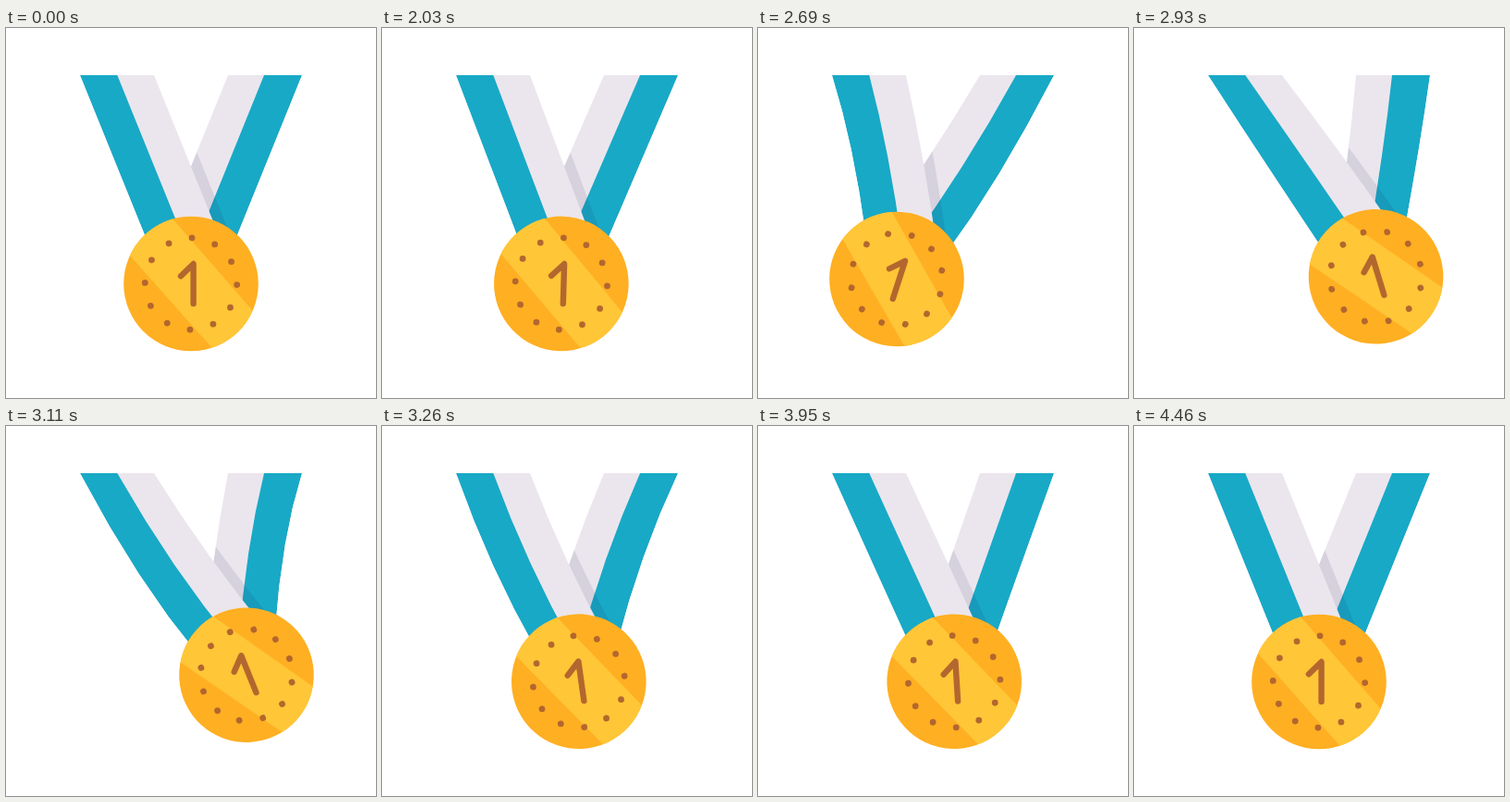
An HTML page without scripts that plays this animation: 400 by 400 pixels, repeating every 4.49 s.

```html
<!DOCTYPE html>
<html lang="en">
<head>
<meta charset="utf-8">
<title>Swinging medal</title>
<style>
@property --swing { syntax: "<angle>"; inherits: true; initial-value: 0deg; }
@property --spin { syntax: "<angle>"; inherits: true; initial-value: 0deg; }

html, body { margin: 0; width: 100%; height: 100%; overflow: hidden; background: #fff; }

.stage {
  --out: cubic-bezier(.39, .575, .565, 1);
  --in-out: cubic-bezier(.37, 0, .63, 1);
  /* medal centre hangs 250px below a pivot; ribbon ends turn with the swing, their bend trails with the spin */
  --turn: calc(var(--swing) * 1.23);
  --cos: cos(var(--turn));
  --sin: sin(var(--turn));
  --bend: calc(var(--spin) * .8);
  --bcos: cos(var(--bend));
  --bsin: sin(var(--bend));
  --cx: calc(200px - 250px * sin(var(--swing)));
  --cy: calc(26.5px + 250px * cos(var(--swing)));
  position: relative; width: 400px; height: 400px; overflow: hidden;
  animation: swing 4490ms infinite var(--in-out), spin 4490ms infinite var(--in-out);
}

/* Each side is a quadratic curve: fixed at the top, its control and end points move with the medal */
.band {
  --lm: calc(var(--l) + 95px * var(--k) - 200px);
  --lb: calc(var(--l) + 190px * var(--k) - 200px);
  --rm: calc(var(--r) + 95px * var(--k) - 200px);
  --rb: calc(var(--r) + 190px * var(--k) - 200px);
  --lmx: calc(var(--cx) + var(--lm) * var(--bcos) + 130.5px * var(--bsin));
  --lmy: calc(var(--cy) + var(--lm) * var(--bsin) - 130.5px * var(--bcos));
  --lbx: calc(var(--cx) + var(--lb) * var(--cos) + 35.5px * var(--sin));
  --lby: calc(var(--cy) + var(--lb) * var(--sin) - 35.5px * var(--cos));
  --rmx: calc(var(--cx) + var(--rm) * var(--bcos) + 130.5px * var(--bsin));
  --rmy: calc(var(--cy) + var(--rm) * var(--bsin) - 130.5px * var(--bcos));
  --rbx: calc(var(--cx) + var(--rb) * var(--cos) + 35.5px * var(--sin));
  --rby: calc(var(--cy) + var(--rb) * var(--sin) - 35.5px * var(--cos));
  position: absolute; inset: 0; background: var(--fill);
  clip-path: polygon(
    var(--l) 51px,
    calc(.5625 * var(--l) + .375 * var(--lmx) + .0625 * var(--lbx)) calc(.5625 * 51px + .375 * var(--lmy) + .0625 * var(--lby)),
    calc(.25 * var(--l) + .5 * var(--lmx) + .25 * var(--lbx)) calc(.25 * 51px + .5 * var(--lmy) + .25 * var(--lby)),
    calc(.0625 * var(--l) + .375 * var(--lmx) + .5625 * var(--lbx)) calc(.0625 * 51px + .375 * var(--lmy) + .5625 * var(--lby)),
    var(--lbx) var(--lby),
    var(--rbx) var(--rby),
    calc(.0625 * var(--r) + .375 * var(--rmx) + .5625 * var(--rbx)) calc(.0625 * 51px + .375 * var(--rmy) + .5625 * var(--rby)),
    calc(.25 * var(--r) + .5 * var(--rmx) + .25 * var(--rbx)) calc(.25 * 51px + .5 * var(--rmy) + .25 * var(--rby)),
    calc(.5625 * var(--r) + .375 * var(--rmx) + .0625 * var(--rbx)) calc(.5625 * 51px + .375 * var(--rmy) + .0625 * var(--rby)),
    var(--r) 51px);
}
.left { --k: .405; --l: 80px; --r: 160px; --fill: #ebe6ed; }
.right { --k: -.405; --l: 240px; --r: 320px; --fill: #ebe6ed; }
.left .teal { --r: 120.3px; --fill: #18a9c7; }
.right .teal { --l: 279px; --fill: #18a9c7; }
.shade { --k: .405; --l: 80px; --r: 172.5px; --fill: rgba(20, 20, 80, .1); }

svg { position: absolute; inset: 0; }
.medal, .face { transform-box: view-box; transform-origin: 200px 276.5px; }
.medal { transform: translate(calc(var(--cx) - 200px), calc(var(--cy) - 276.5px)) rotate(var(--swing)); }
.face { transform: rotate(calc(var(--spin) - var(--swing))); }
.face > * { fill: none; stroke: #b3672e; stroke-linecap: round; stroke-linejoin: round; }

@keyframes swing {
  0%, 45.2% { --swing: 0deg; }
  45.21% { --swing: 1.4deg; animation-timing-function: var(--out); }
  57.75% { --swing: 15.83deg; }
  66.93% { --swing: -16.75deg; }
  77.4% { --swing: 7.5deg; }
  89.42% { --swing: -3.15deg; }
  99.4%, 100% { --swing: 0deg; }
}
@keyframes spin {
  0%, 45.2% { --spin: 0deg; }
  45.21% { --spin: 1.7deg; animation-timing-function: var(--out); }
  58.35% { --spin: 21deg; }
  67.7% { --spin: -24deg; }
  78.4% { --spin: 12.5deg; }
  90.2% { --spin: -5deg; }
  99.4%, 100% { --spin: 0deg; }
}
</style>
</head>
<body>
<div class="stage">
  <div class="band right">
    <div class="band teal"></div>
    <div class="band shade"></div>
  </div>
  <div class="band left">
    <div class="band teal"></div>
  </div>
  <svg width="400" height="400" viewBox="0 0 400 400">
    <clipPath id="disc"><circle cx="200" cy="276.5" r="72.8"/></clipPath>
    <g class="medal">
      <circle cx="200" cy="276.5" r="72.8" fill="#ffaf22"/>
      <path d="M162.6 186 284.4 326 239.6 364.8 116.4 226.2Z" fill="#ffc637" clip-path="url(#disc)"/>
      <g class="face">
        <circle cx="200" cy="276.5" r="49.7" stroke-width="6.8" pathLength="360" stroke-dasharray="0 30" transform="rotate(-88.8 200 276.5)"/>
        <path d="M189 268.3 202.6 255V298" stroke-width="6.4"/>
      </g>
    </g>
  </svg>
</div>
</body>
</html>
```
